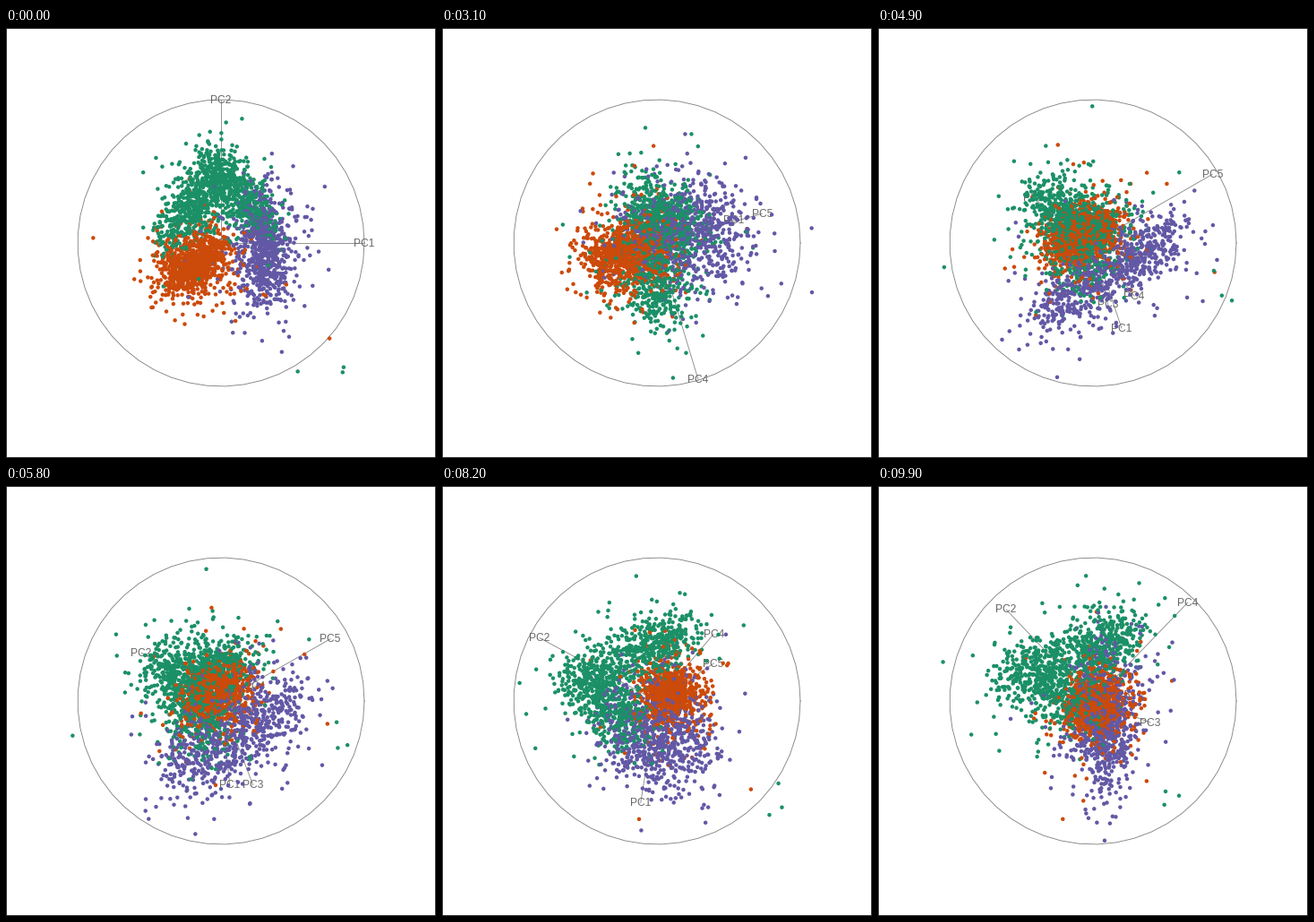
Recreate the animation shown at these times as a matplotlib script. Size 480 by 480 pixels, loop 10000 ms.

```python
import numpy as np
import matplotlib.pyplot as plt
from matplotlib.animation import FuncAnimation
from matplotlib.patches import Rectangle

SIZE, R, FRAMES = 480, 160, 100
GREEN, ORANGE, PURPLE = "#1b9067", "#cc4a0a", "#6258a5"
rng = np.random.default_rng(7)

# Frame index -> where the ends of PC1..PC5 sit, in pixels from the centre;
# axes left out follow from the previous pose
POSES = {
    16: {2: (29, 123), 3: (-76, 47), 4: (13, -86), 5: (132, 0)},
    31: {1: (85, 26), 3: (48, 16), 4: (46, -154), 5: (117, 33)},
    41: {1: (48, -77), 2: (-43, 32), 3: (0, -29), 4: (43, -113), 5: (140, 71)},
    58: {1: (10, -94), 2: (-89, 54), 3: (36, -94), 4: (38, 16), 5: (122, 69)},
    82: {1: (-18, -114), 2: (-131, 71), 4: (63, 75), 5: (63, 42)},
    99: {2: (-97, 102), 3: (64, -24), 4: (106, 110)},
}


def cloud(path, t, sd, fill=0):
    """Heavy-tailed scatter around a polyline in five dimensions."""
    path = np.array(path, float)
    knots = np.linspace(0, 1, len(path))
    mid = np.column_stack([np.interp(t, knots, c) for c in path.T])
    pull = fill * rng.uniform(0, 1, (len(t), 1)) ** 2
    mid += pull * (mid.mean(axis=0) - mid)
    tail = np.sqrt(5 / np.maximum(rng.chisquare(5, (len(t), 1)), 0.6))
    return mid + 0.8 * tail * rng.normal(size=mid.shape) * sd


def make_data():
    green = cloud([(-66, -8, 5, 45, 10), (-42, 36, 0, 78, 8),
                   (-10, 98, -20, -48, 0),
                   (30, 58, 5, -28, -5), (62, 8, 32, -5, -10)],
                  rng.uniform(0, 1, 1100), (13, 15, 20, 22, 22), fill=0.7)
    orange = cloud([(-54, -38, 5, 0, -56), (2, -4, -35, 0, 34)],
                   rng.beta(1.3, 1.8, 950), (18, 18, 17, 22, 17))
    purple = cloud([(45, 10, 40, 0, -75), (50, -20, -15, 0, 85)],
                   rng.uniform(0, 1, 800), (18, 16, 26, 18, 22))
    # PC2 and PC4 vary together in this group
    purple += rng.normal(size=(800, 1)) * [0, 28, 0, 29, 0]
    far = (115, -145, -60, 10, 75) + rng.normal(0, 14, (4, 5))
    pts = np.vstack([green, orange, purple, far])
    cols = np.repeat([GREEN, ORANGE, PURPLE, GREEN, ORANGE],
                     [1100, 950, 800, 3, 1])
    order = rng.permutation(len(pts))
    return pts[order], cols[order]


def orthonormal(m):
    u, _, vt = np.linalg.svd(m, full_matrices=False)
    return u @ vt


def settle(prev, ends):
    """Orthonormal basis near prev whose axes end at the given places."""
    m = prev.copy()
    for _ in range(60):
        for k, end in ends.items():
            m[k - 1] = np.array(end) / R
        m = orthonormal(m)
    return m


def geodesic(a, b, t):
    """Basis a share t of the way from plane a to plane b."""
    u, c, vt = np.linalg.svd(a.T @ b)
    ang = np.arccos(np.clip(c, -1, 1))
    ga, gb = a @ u, b @ vt.T
    q = gb - ga * c
    q /= np.maximum(np.linalg.norm(q, axis=0), 1e-9)
    g = ga * np.cos(t * ang) + q * np.sin(t * ang)
    spin = u @ vt
    phi = t * np.arctan2(spin[1, 0], spin[0, 0])
    rot = np.array([[np.cos(phi), -np.sin(phi)], [np.sin(phi), np.cos(phi)]])
    return g @ u.T @ rot


times, bases = [0], [np.eye(5, 2)]
for time, ends in POSES.items():
    times.append(time)
    bases.append(settle(bases[-1], ends))


def basis(i):
    k = min(np.searchsorted(times, i, side="right") - 1, len(times) - 2)
    t = (i - times[k]) / (times[k + 1] - times[k])
    return geodesic(bases[k], bases[k + 1], t)


points, colors = make_data()

fig = plt.figure(figsize=(SIZE / 72, SIZE / 72), dpi=72, facecolor="white")
ax = fig.add_axes([0, 0, 1, 1])
ax.set(xlim=(-SIZE / 2, SIZE / 2), ylim=(-SIZE / 2, SIZE / 2))
ax.axis("off")

theta = np.linspace(0, 2 * np.pi, 50)
ax.plot(R * np.cos(theta), R * np.sin(theta), color="#858585", lw=0.9, zorder=1)
# Half of the border falls outside the stage, one pixel stays
ax.add_patch(Rectangle((0, 0), 1, 1, transform=ax.transAxes, fill=False,
                       ec="#303030", lw=2, zorder=5))
axes_lines = [ax.plot([], [], color="#8c8c8c", lw=0.9, zorder=1)[0]
              for _ in range(5)]
labels = [ax.text(0, 0, f"PC{k + 1}", family="Liberation Sans", size=12,
                  color="#666666", ha="center", va="center", zorder=2)
          for k in range(5)]
dots = ax.scatter(points[:, 0], points[:, 1], s=20, c=colors, linewidths=0,
                  zorder=3)


def draw(i):
    b = basis(i)
    dots.set_offsets(points @ b)
    for line, label, (x, y) in zip(axes_lines, labels, b * R):
        line.set_data([0, x], [0, y])
        label.set_position((x, y - 0.5))
    return [dots, *axes_lines, *labels]


anim = FuncAnimation(fig, draw, frames=FRAMES, interval=100, repeat=True,
                     repeat_delay=0)
plt.show()
```
